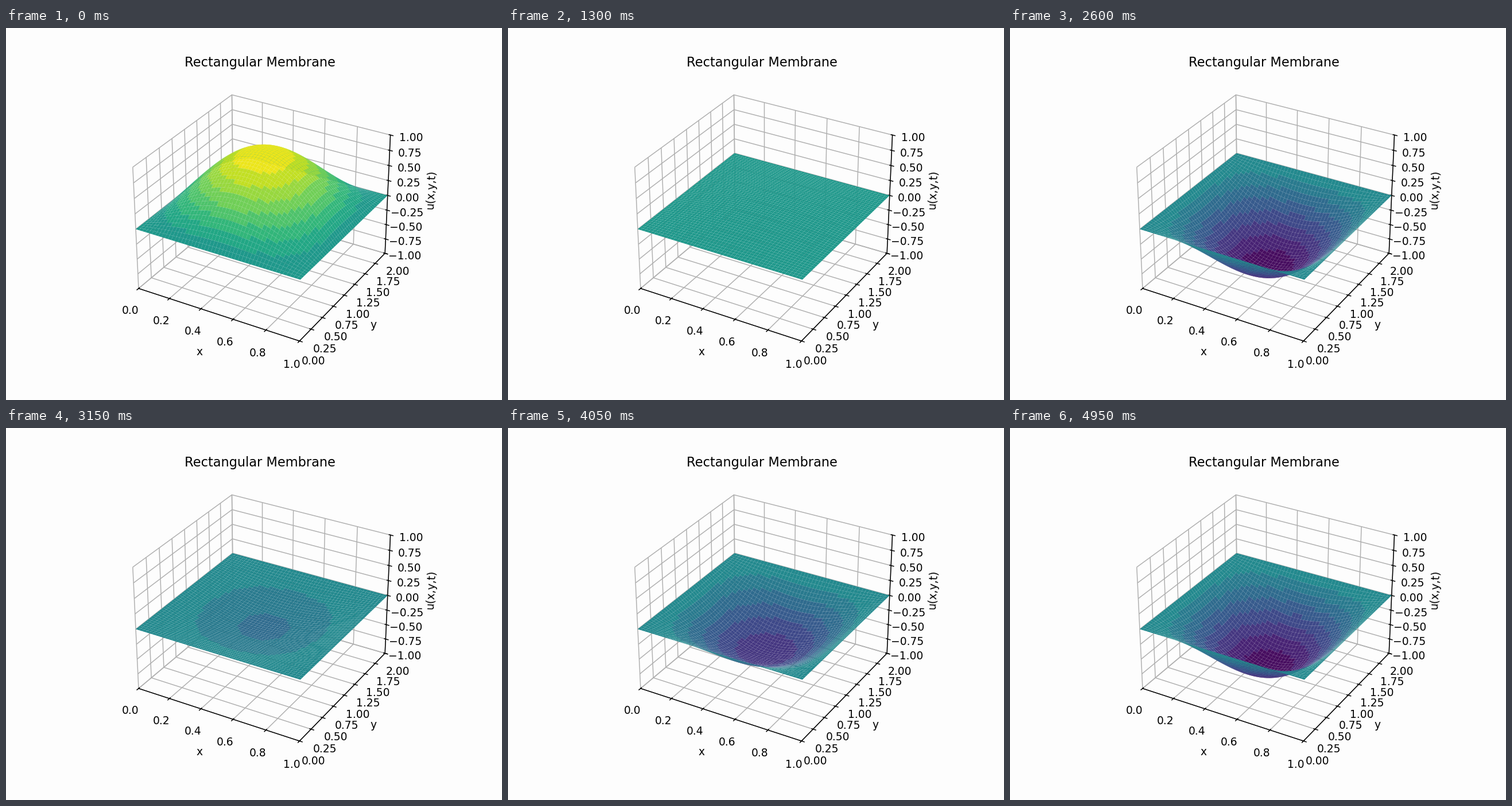
Recreate the animation shown at these times as a matplotlib script. Size 864x648 px, loop 5000 ms.

```python
import numpy as np
import matplotlib as mpl
import matplotlib.pyplot as plt
from matplotlib.animation import FuncAnimation
from matplotlib.colors import ListedColormap
from mpl_toolkits.mplot3d.art3d import Poly3DCollection

WIDTH, HEIGHT, DPI = 864, 648, 135
FRAMES, INTERVAL = 100, 50
LX, LY = 1.0, 2.0
POINTS = 50
LEVELS = 16
PAPER = "#fdfdfd"

plt.rcParams["font.family"] = "DejaVu Sans"

# Fundamental mode of a membrane fixed along its edges
x, y = np.meshgrid(np.linspace(0, LX, POINTS), np.linspace(0, LY, POINTS))
mode = np.sin(np.pi * x / LX) * np.sin(np.pi * y / LY)
omega = np.pi * np.hypot(1 / LX, 1 / LY)
times = np.linspace(0, 6 * np.pi, FRAMES)


def cells(z):
    """Return the quads of the grid as an array of shape (n, 4, 3)."""
    p = np.stack([x, y, z], axis=-1)
    corners = [p[:-1, :-1], p[:-1, 1:], p[1:, 1:], p[1:, :-1]]
    return np.stack(corners, axis=2).reshape(-1, 4, 3)


fig = plt.figure(figsize=(WIDTH / DPI, HEIGHT / DPI), dpi=DPI, facecolor=PAPER)
ax = fig.add_subplot(projection="3d", facecolor=PAPER)
ax.set_title("Rectangular Membrane")
ax.set(xlabel="x", ylabel="y", zlabel="u(x,y,t)")
ax.set_xticks(np.linspace(0, LX, 6))
ax.set_yticks(np.linspace(0, LY, 9))
ax.set_zticks(np.linspace(-1, 1, 9))
ax.set(xlim=(0, LX), ylim=(0, LY), zlim=(-1, 1))
for axis in (ax.xaxis, ax.yaxis, ax.zaxis):
    axis.set_pane_color((1, 1, 1, 0))

# Banded colours, each taken from the middle of its band
bands = mpl.colormaps["viridis"]((np.arange(LEVELS) + 0.5) / LEVELS)
surface = Poly3DCollection(cells(mode), cmap=ListedColormap(bands))
surface.set_clim(-1, 1)
ax.add_collection3d(surface)


def update(i):
    quads = cells(mode * np.cos(omega * times[i]))
    surface.set_verts(quads)
    surface.set_array(quads[:, :, 2].mean(axis=1))
    return (surface,)


anim = FuncAnimation(fig, update, frames=FRAMES, interval=INTERVAL,
                     repeat=True, repeat_delay=0, blit=False)
plt.show()
```
